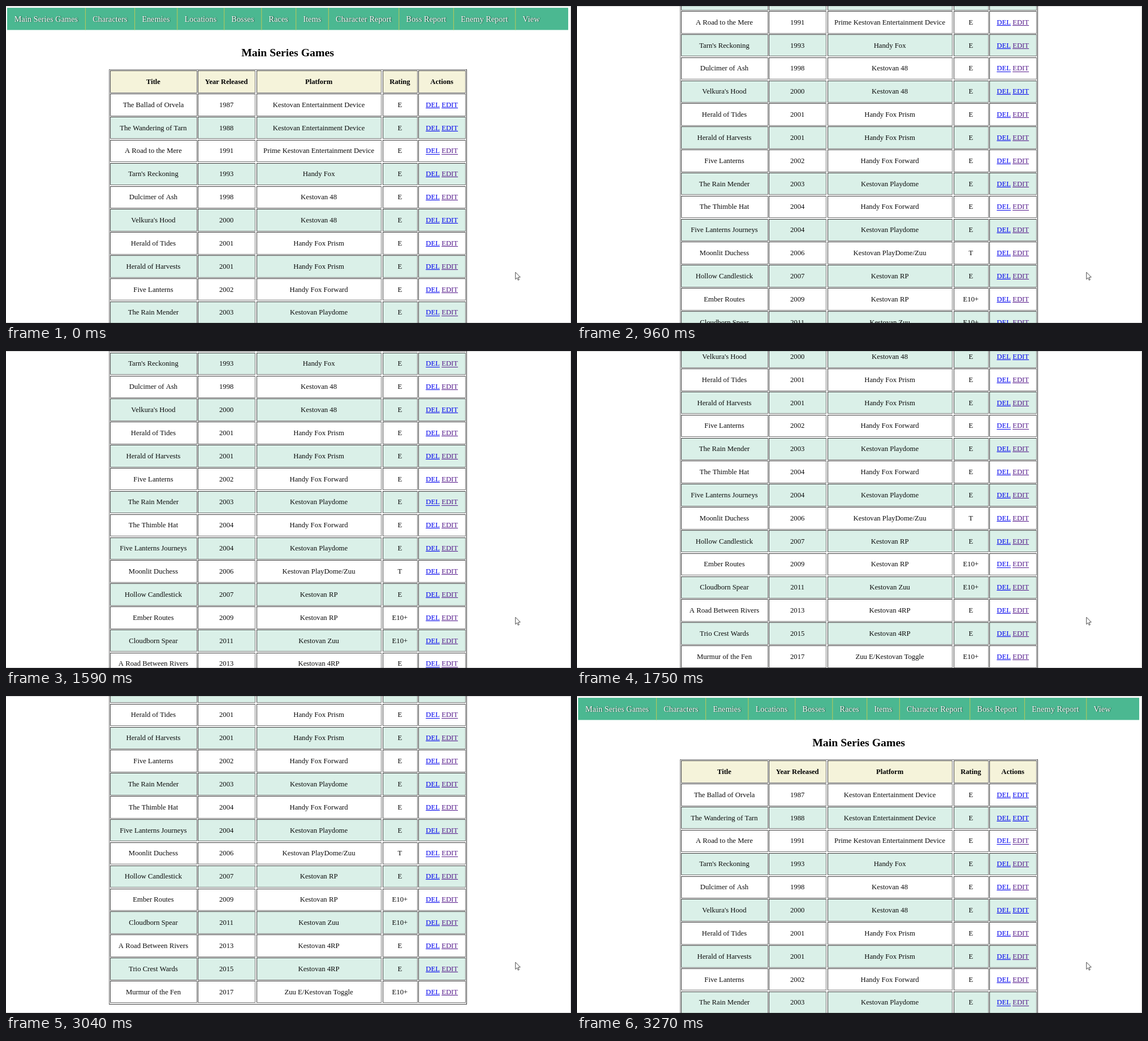
Animation, 999 px wide and 561 px high, one loop 3.89 s. Source, as an HTML page with a canvas:

```html
<!DOCTYPE html>
<html lang="en">
<head>
<meta charset="utf-8">
<title>Main Series Games</title>
<style>
  html, body { margin: 0; width: 100%; height: 100%; overflow: hidden; background: #fff; }
  canvas { display: block; }
</style>
</head>
<body>
<canvas id="stage" width="999" height="561"></canvas>
<script>
const ctx = document.getElementById('stage').getContext('2d');
const W = 999, H = 561, LOOP = 3890;
const SCALE = 0.7855; // page units to stage pixels
const FAMILY = '"Liberation Serif", "Times New Roman", serif';
const BODY = `16.2px ${FAMILY}`;
const BOLD = `bold 16.05px ${FAMILY}`;
const INK = '#0c0c0c', BLUE = '#0000ee', VISITED = '#551a8b';
const DARK = '#3a3a3a', LIGHT = '#727272';

// [time in ms, scroll offset in page units]
const scrolls = [
  [0, 0], [800, 2], [880, 160], [960, 290], [1040, 299], [1140, 300],
  [1590, 350], [1750, 470], [1840, 497], [1920, 501.5],
  [3040, 492], [3120, 300], [3200, 45], [3270, 0]
];
let scroll = 0;

const nav = [
  ['Main Series Games', 2], ['Characters', 140.4], ['Enemies', 227.6],
  ['Locations', 302.9], ['Bosses', 385.8], ['Races', 451.8], ['Items', 512.7],
  ['Character Report', 570.3], ['Boss Report', 694.8], ['Enemy Report', 791.4],
  ['View', 900.8]
];

const columns = [
  ['Title', 195], ['Year Released', 130], ['Platform', 282], ['Rating', 79], ['Actions', 106]
];

const maker = 'Kestovan', handheld = 'Handy Fox';
const console1 = maker + ' Entertainment Device';
const rows = [
  ['The Ballad of Orvela', 1987, console1],
  ['The Wandering of Tarn', 1988, console1],
  ['A Road to the Mere', 1991, 'Prime ' + console1],
  ["Tarn's Reckoning", 1993, handheld],
  ['Dulcimer of Ash', 1998, maker + ' 48'],
  ["Velkura's Hood", 2000, maker + ' 48'],
  ['Herald of Tides', 2001, handheld + ' Prism'],
  ['Herald of Harvests', 2001, handheld + ' Prism'],
  ['Five Lanterns', 2002, handheld + ' Forward'],
  ['The Rain Mender', 2003, maker + ' Playdome'],
  ['The Thimble Hat', 2004, handheld + ' Forward'],
  ['Five Lanterns Journeys', 2004, maker + ' Playdome'],
  ['Moonlit Duchess', 2006, maker + ' PlayDome/Zuu', 'T'],
  ['Hollow Candlestick', 2007, maker + ' RP'],
  ['Ember Routes', 2009, maker + ' RP', 'E10+'],
  ['Cloudborn Spear', 2011, maker + ' Zuu', 'E10+'],
  ['A Road Between Rivers', 2013, maker + ' 4RP'],
  ['Trio Crest Wards', 2015, maker + ' 4RP'],
  ['Murmur of the Fen', 2017, 'Zuu E/' + maker + ' Toggle', 'E10+']
];
const unvisited = [0, 1, 5];

const TABLE = { x: 231.4, y: 142.5, cell: 50, gap: 2 };
const PITCH = TABLE.cell + TABLE.gap;

const snapX = x => Math.round(x * SCALE);
const snapY = y => Math.round((y - scroll) * SCALE);

function stageSpace() {
  ctx.setTransform(1, 0, 0, 1, 0, 0);
}

function pageSpace() {
  ctx.setTransform(SCALE, 0, 0, SCALE, 0, -scroll * SCALE);
}

function rect(x, y, w, h, color) {
  ctx.fillStyle = color;
  ctx.fillRect(x, y, w, h);
}

function text(str, x, y, font, color, align = 'center') {
  ctx.font = font;
  ctx.fillStyle = color;
  ctx.textAlign = align;
  ctx.fillText(str, x, y);
}

// Box with hairline borders aligned to stage pixels.
function box(x, y, w, h, fill, topLeft, bottomRight) {
  const l = snapX(x), t = snapY(y), r = snapX(x + w - 1), b = snapY(y + h - 1);
  stageSpace();
  rect(l, t, r - l, b - t, fill);
  rect(l, b, r - l + 1, 1, bottomRight);
  rect(r, t, 1, b - t + 1, bottomRight);
  rect(l, t, r - l, 1, topLeft);
  rect(l, t, 1, b - t, topLeft);
  pageSpace();
}

function link(str, x, y, color) {
  text(str, x, y, BODY, color, 'left');
  const w = ctx.measureText(str).width;
  stageSpace();
  rect(x * SCALE, snapY(y + 1.5), w * SCALE, 1, color);
  pageSpace();
}

function actions(cx, y, visited) {
  ctx.font = BODY;
  const del = ctx.measureText('DEL ').width;
  const x = cx - ctx.measureText('DEL EDIT').width / 2;
  link('DEL', x, y, BLUE);
  link('EDIT', x + del, y, visited ? VISITED : BLUE);
}

function drawNav() {
  rect(2.5, 4, 1263, 50, '#4bb891');
  nav.forEach(([label, px], i) => {
    const x = px / SCALE;
    if (i) rect(x - 0.6, 4, 1.2, 50, '#c3cb55');
    ctx.shadowColor = 'rgba(0,0,0,.75)';
    ctx.shadowOffsetX = ctx.shadowOffsetY = 0.8;
    ctx.shadowBlur = 1.5;
    text(label, x + 16.3, 35.2, `18.27px ${FAMILY}`, '#fff', 'left');
    ctx.shadowColor = 'transparent';
  });
}

function drawRow(values, y, fill, index) {
  let x = TABLE.x + 1 + TABLE.gap;
  const base = y + TABLE.cell / 2 + 5.1;
  columns.forEach(([, w], c) => {
    box(x, y, w, TABLE.cell, fill, DARK, LIGHT);
    const cx = x + w / 2 - 0.3;
    if (index >= 0 && c === 4) actions(cx, base, !unvisited.includes(index));
    else text(values[c], cx, base, index < 0 ? BOLD : BODY, index < 0 ? '#000' : INK);
    x += w + TABLE.gap;
  });
}

function drawTable() {
  const width = columns.reduce((sum, c) => sum + c[1] + TABLE.gap, TABLE.gap + 2);
  const height = (rows.length + 1) * PITCH + TABLE.gap + 2;
  const top = TABLE.y + 1 + TABLE.gap;
  box(TABLE.x, TABLE.y, width, height, '#fff', LIGHT, DARK);
  drawRow(columns.map(c => c[0]), top, '#f5f3da', -1);
  rows.forEach(([title, year, platform, rating = 'E'], i) => {
    drawRow([title, year, platform, rating], top + (i + 1) * PITCH, i % 2 ? '#daf0e8' : '#fff', i);
  });
}

function drawCursor() {
  const pts = [[900.8, 471.2], [900.8, 483.6], [903.6, 481], [905.4, 485.2],
               [907.3, 484.4], [905.5, 480.2], [909.3, 479.9]];
  ctx.beginPath();
  pts.forEach(p => ctx.lineTo(...p));
  ctx.closePath();
  ctx.fillStyle = '#fff';
  ctx.fill();
  ctx.lineWidth = 0.9;
  ctx.strokeStyle = '#333';
  ctx.stroke();
}

function draw(now) {
  const t = now % LOOP;
  scroll = scrolls.filter(s => s[0] <= t).pop()[1];
  stageSpace();
  rect(0, 0, W, H, '#fff');
  pageSpace();
  drawNav();
  text('Main Series Games', 634, 113.3, `bold 25.2px ${FAMILY}`, '#000');
  drawTable();
  link('Add New', 3.5, 1218.5, VISITED);
  stageSpace();
  const edge = 'rgba(0,0,0,.18)';
  rect(0, 0, W, 1, edge);
  rect(W - 1, 1, 1, H - 2, edge);
  rect(0, H - 1, W, 1, edge);
  drawCursor();
}

const start = performance.now();
function tick() {
  draw(performance.now() - start);
  requestAnimationFrame(tick);
}
tick();
</script>
</body>
</html>
```
